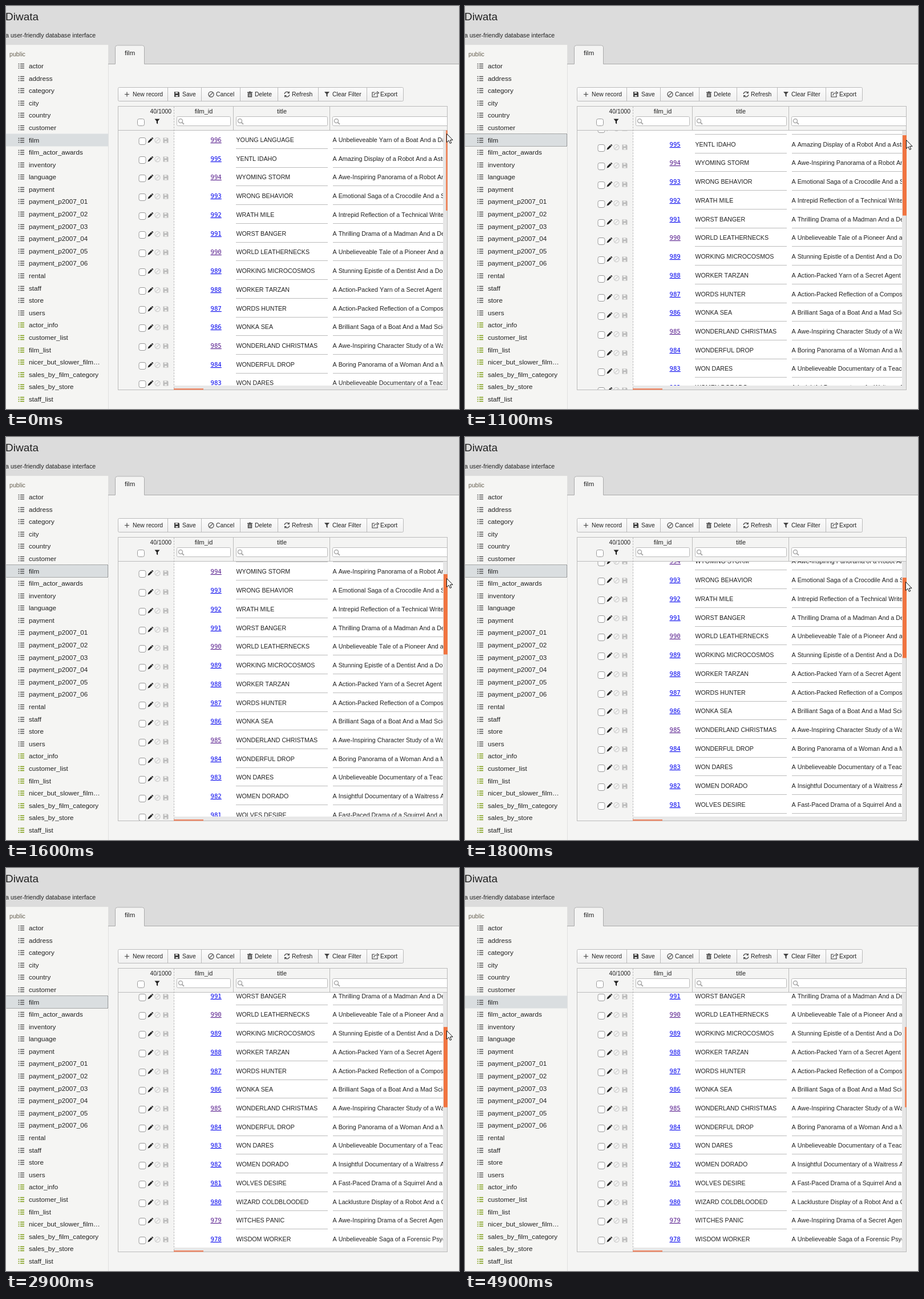
These frames come from a looping animation (794x705 px, 5000 ms). An HTML page:

```html
<!DOCTYPE html>
<html lang="en">
<head>
<meta charset="utf-8">
<title>Database interface</title>
<style>
html, body { margin: 0; width: 100%; height: 100%; overflow: hidden; background: #f4f4f3; }
svg { display: block; }
text { font-family: "Liberation Sans", Arial, sans-serif; font-size: 10.67px; font-kerning: none; fill: #222; white-space: pre; }
.id { font-family: "DejaVu Sans Mono", monospace; fill: #00e; text-decoration: underline; }
.seen { fill: #551a8b; }
.about { font-size: 10.75px; }
.side { font-size: 11.7px; }
.btn { font-size: 10.4px; }
.head { font-size: 10.9px; text-anchor: middle; }
.line { fill: none; stroke: #bbb; }
.box { fill: #fff; stroke: #bbb; }
.check { fill: #fff; stroke: #999; }
</style>
</head>
<body>
<svg id="stage" width="794" height="705" viewBox="0 0 794 705">
  <defs>
    <clipPath id="dataClip"><rect x="295" y="218" width="471" height="446"/></clipPath>
    <clipPath id="toolClip"><rect x="197" y="218" width="98" height="453"/></clipPath>
    <clipPath id="tableClip"><rect x="196" y="175" width="578" height="497"/></clipPath>
    <linearGradient id="bar" x2="0" y2="1"><stop stop-color="#fcfcfc"/><stop offset="1" stop-color="#f0f0f0"/></linearGradient>
    <g id="list" stroke-width="1.3"><path d="M21.5 -3.5h2m1.5 0h7M21.5 0h2m1.5 0h7M21.5 3.5h2m1.5 0h7"/></g>
    <g id="plus"><path d="M-4 0h8M0 -4v8" stroke="#444" stroke-width="1.2"/></g>
    <path id="floppy" d="M-4.5 -4.5h7.5l1.5 1.5v7.5h-9zM-2.5 -3.8v2.4h4v-2.4zM-2 1.5v2.2h4v-2.2z" fill-rule="evenodd"/>
    <g id="ban" fill="none" stroke-width="1.2"><circle r="4.6"/><path d="M-3.2 3.2L3.2 -3.2"/></g>
    <path id="trash" d="M-4.5 -4h3v-1h3v1h3v1.4h-9zM-3.7 -2h7.4v7h-7.4zM-2 -.7v4.4h.8v-4.4zM-.4 -.7v4.4h.8v-4.4zM1.2 -.7v4.4h.8v-4.4z" fill-rule="evenodd"/>
    <g id="refresh" fill="none" stroke="#444" stroke-width="1.2"><path d="M-4.3 -.5A4.3 4.3 0 0 1 3.4 -2.7M4.3 .5A4.3 4.3 0 0 1 -3.4 2.7M3.8 -5v2.8h-2.8M-3.8 5v-2.8h2.8"/></g>
    <path id="funnel" d="M-4.5 -4.5h9l-3.4 4v5l-2.2 -1.6v-3.4z"/>
    <g id="export" fill="none" stroke="#444" stroke-width="1.2"><path d="M-2 -3.5h-4v8h9v-3.5M-3 2c0 -3 2 -4.5 6 -4.5M2 -5l3.5 2.5l-3.5 2.5"/></g>
    <path id="pencil" d="M-4.5 4.5l1 -3.2l5 -5l2.2 2.2l-5 5zM2.1 -4.2l.8 -.7q.6 -.4 1.2 .1l.8 .9q.5 .6 0 1.1l-.7 .7z"/>
    <g id="lens" fill="none" stroke="#aaa" stroke-width="1.5"><circle cx="-1" cy="-1" r="3.5"/><path d="M1.6 1.6L5 5" stroke-width="2"/></g>
  </defs>
</svg>
<script>
const stage = document.getElementById('stage');
const PITCH = 32.73, LOOP = 5000, STEP = 100;

const tables = ('actor address category city country customer film film_actor_awards inventory language payment ' +
  'payment_p2007_01 payment_p2007_02 payment_p2007_03 payment_p2007_04 payment_p2007_05 payment_p2007_06 ' +
  'rental staff store users').split(' ');
const views = 'actor_info customer_list film_list nicer_but_slower_film… sales_by_film_category sales_by_store staff_list'.split(' ');

const films = `YOUNG LANGUAGE|Unbelieveable Yarn of a Boat And a Database
YENTL IDAHO|Amazing Display of a Robot And a Astronaut
WYOMING STORM|Awe-Inspiring Panorama of a Robot And a Boat
WRONG BEHAVIOR|Emotional Saga of a Crocodile And a Sumo
WRATH MILE|Intrepid Reflection of a Technical Writer And
WORST BANGER|Thrilling Drama of a Madman And a Dentist
WORLD LEATHERNECKS|Unbelieveable Tale of a Pioneer And a Boat
WORKING MICROCOSMOS|Stunning Epistle of a Dentist And a Dog
WORKER TARZAN|Action-Packed Yarn of a Secret Agent And
WORDS HUNTER|Action-Packed Reflection of a Composer And
WONKA SEA|Brilliant Saga of a Boat And a Mad Scientist
WONDERLAND CHRISTMAS|Awe-Inspiring Character Study of a Waitress
WONDERFUL DROP|Boring Panorama of a Woman And a Madman
WON DARES|Unbelieveable Documentary of a Teacher And
WOMEN DORADO|Insightful Documentary of a Waitress And
WOLVES DESIRE|Fast-Paced Drama of a Squirrel And a Robot
WIZARD COLDBLOODED|Lacklusture Display of a Robot And a Girl
WITCHES PANIC|Awe-Inspiring Drama of a Secret Agent And
WISDOM WORKER|Unbelieveable Saga of a Forensic Psychologist`.split('\n').map(f => f.split('|'));
const visited = [996, 994, 990, 985, 979];

const text = (x, y, s, cls = '', extra = '') => `<text x="${x}" y="${y}" class="${cls}" ${extra}>${s}</text>`;
const rect = (x, y, w, h, attrs) => `<rect x="${x}" y="${y}" width="${w}" height="${h}" ${attrs}/>`;
const path = (d, attrs = 'class="line"') => `<path d="${d}" ${attrs}/>`;
const icon = (id, x, y, attrs = 'fill="#444"') => `<use href="#${id}" x="${x}" y="${y}" ${attrs}/>`;
const check = (x, y) => rect(x, y, 12, 12, 'rx="3" class="check"');

function page() {
  let s = rect(0, 0, 794, 101, 'fill="#dcdcdc"') + rect(0, 68, 179, 637, 'fill="#f5f5f3"') +
    path('M179.5 68V705', 'stroke="#e0e0e0"') +
    text(-1, 25, 'Diwata', '', 'style="font-size:19px"') +
    text(-1, 55, 'a user-friendly database interface') +
    text(6, 88, 'public', '', 'style="fill:#665f50"') +
    rect(0, 223.5, 179, 22, 'fill="#dadee0"') +
    path('M0 223.5H178.5V245.5H0', 'id="focus" fill="none" stroke="#666" stroke-dasharray="1 1" stroke-dashoffset="1"');
  [...tables, ...views].forEach((name, i) => {
    const y = Math.round(105 + i * 21.59);
    s += icon('list', 0, y, `stroke="${i < tables.length ? '#555' : '#7a9a10'}"`) + text(40, y + 4, name, 'side');
  });

  s += path('M179 101.5H191.5V73a4 4 0 0 1 4 -4H238.5a4 4 0 0 1 4 4V101.5H794', 'fill="none" stroke="#aaa"') +
    path('M192 102V73a3.5 3.5 0 0 1 3.5 -3.5H238.5a3.5 3.5 0 0 1 3.5 3.5V102z', 'fill="#f4f4f3"') +
    text(208, 86, 'film', 'side');

  s += rect(196.5, 142.5, 500, 24, 'rx="2" fill="url(#bar)" stroke="#bbb"') +
    path([283.5, 342.5, 410.5, 476.5, 547.5, 632.5].map(x => `M${x} 143V166`).join(''));
  [['plus', 212, 222, 'New record'], ['floppy', 299.5, 309, 'Save'], ['ban', 359.5, 368, 'Cancel'],
   ['trash', 427.5, 436, 'Delete'], ['refresh', 492.5, 501, 'Refresh'], ['funnel', 562.5, 572, 'Clear Filter'],
   ['export', 648, 656, 'Export']].forEach(([id, ix, x, label]) => {
    s += icon(id, ix, 154.5, id === 'ban' ? 'stroke="#444"' : 'fill="#444"') + text(x, 158, label, 'btn');
  });
  return s;
}

function grid() {
  let data = '', tools = '';
  films.forEach(([title, about], i) => {
    const y = Math.round(i * PITCH), id = 996 - i;
    data += text(358.5, y + 238, id, visited.includes(id) ? 'id seen' : 'id') +
      text(403.5, y + 238, title) + text(572.5, y + 238, 'A ' + about, 'about') +
      path(`M403 ${y + 249.5}H564M573 ${y + 249.5}H766`);
    tools += check(233, y + 230.5) + icon('pencil', 253, y + 235, 'fill="#222"') +
      icon('ban', 265.5, y + 235, 'stroke="#ccc"') + icon('floppy', 280, y + 235, 'fill="#bbb"');
  });
  let s = rect(196, 176, 578, 41, 'fill="#f4f4f3"') + rect(295, 218, 471, 446, 'fill="#fff"') +
    `<g clip-path="url(#dataClip)"><g id="data">${data}</g></g>` +
    `<g clip-path="url(#toolClip)"><g id="tools">${tools}</g></g>` +
    rect(766, 218, 8, 453, 'fill="#e6e6e6"') + rect(295, 664, 471, 7, 'fill="#e8e8e8"') +
    path('M196 217.5H774M398.5 176V217M567.5 176V217') +
    path('M294.5 176V671', 'stroke="#bbb" stroke-dasharray="3 2"') +
    text(290, 188, '40/1000', 'btn', 'text-anchor="end"') +
    check(230.5, 197.5) + icon('funnel', 265, 202, 'fill="#222"') +
    text(346.5, 188, 'film_id', 'head') + text(483.5, 188, 'title', 'head');
  [[299.5, 94], [403.5, 160], [572.5, 240]].forEach(([x, w]) => {
    s += rect(x, 193.5, w, 16, 'rx="2" class="box"') + icon('lens', x + 7.5, 202);
  });
  return `<g clip-path="url(#tableClip)">${s}</g>` + rect(196.5, 175.5, 577, 496, 'class="line"') +
    rect(294, 669, 52, 2.5, 'fill="#ee8a69"') +
    '<rect id="thumb" height="140.5" fill="#f07440"/>' +
    path('M.5 .5V15.5L4 12.2L6.4 17.4L8.7 16.4L6.4 11.4H11z', 'id="cursor" fill="#fff" stroke="#111"');
}

stage.insertAdjacentHTML('beforeend', page() + grid());
const [focus, data, tools, thumb, cursor] =
  ['focus', 'data', 'tools', 'thumb', 'cursor'].map(id => document.getElementById(id));

// Linear interpolation through [time, value] points
function along(points, t) {
  if (t <= points[0][0]) return points[0][1];
  for (let i = 1; i < points.length; i++) {
    const [t0, a] = points[i - 1], [t1, b] = points[i];
    if (t <= t1) return a + (b - a) * (t - t0) / (t1 - t0);
  }
  return points[points.length - 1][1];
}

const scroll = [[600, 0], [800, 4.7], [1300, 38], [1800, 82], [2200, 134], [2600, 174]];
const lagged = [[600, 0], [800, 3], [1300, 33], [1800, 82], [2200, 132], [2600, 171], [2800, 171], [2900, 174]];
const dragY = [[600, 223], [800, 227], [1300, 238], [1800, 253], [2200, 272], [2600, 284]];
const wide = [[300, 0], [500, 1], [3000, 1], [3200, 0]];

function pointer(t) {
  if (t <= 2900) return [t >= 700 && t < 1500 ? 773 : 772, Math.round(along(dragY, t))];
  if (t < 3500) {
    const p = (t - 2900) / 500, e = p * p * (3 - 2 * p);
    return [Math.round(772 - 395 * e), Math.round(284 - 297 * e)];
  }
  if (t >= 3700 && t < 4000) return [t < 3900 ? 401 : 398, -11];
  return [0, -50];
}

function draw(now) {
  const t = Math.floor(now % LOOP / STEP) * STEP;
  const top = along(scroll, t), w = along(wide, t), width = 3 + 4 * w;
  data.setAttribute('transform', `translate(0 ${-Math.round(top)})`);
  tools.setAttribute('transform', `translate(0 ${-Math.round(along(lagged, t))})`);
  thumb.setAttribute('x', 774 - width);
  thumb.setAttribute('width', width);
  thumb.setAttribute('y', 217.5 + top / 2.87);
  thumb.setAttribute('opacity', 0.8 + 0.2 * w);
  cursor.setAttribute('transform', `translate(${pointer(t)})`);
  focus.style.display = t >= 400 && t < 4900 ? '' : 'none';
}

const start = performance.now();
function tick() {
  draw(performance.now() - start);
  requestAnimationFrame(tick);
}
tick();
</script>
</body>
</html>
```
